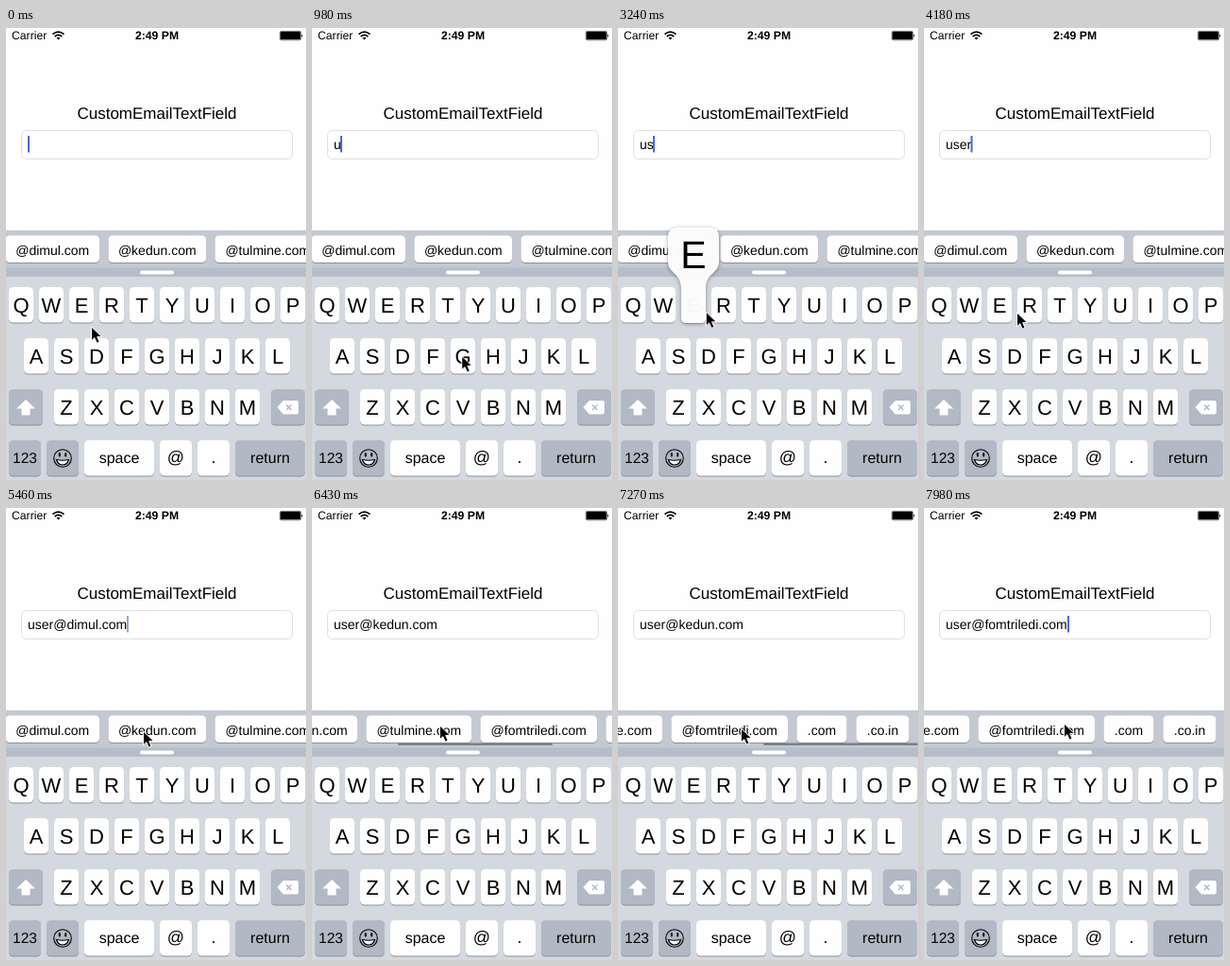
Animation of 318 by 478 pixels, one loop 8 s. Source, as an HTML page:

```html
<!DOCTYPE html>
<html lang="en">
<head>
<meta charset="utf-8">
<title>CustomEmailTextField</title>
<style>
html, body { margin: 0; width: 100%; height: 100%; overflow: hidden; background: #fefefe; }
svg { display: block; width: 318px; height: 478px; font: 14px "Liberation Sans", Arial, sans-serif; text-rendering: geometricPrecision; }
.mid { text-anchor: middle; }
.key { fill: #fefefe; }
.key.dark { fill: #b1b9c5; }
.under { fill: #8d929a; }
.anim, .step { animation: 8s infinite; }
.anim { animation-timing-function: ease-in-out; }
.step { animation-timing-function: step-end; }
#cursor { animation-name: cursor; }
#strip { animation-name: scroll; }
#bar { animation-name: bar; }
#thumb { animation-name: thumb; }
#typed { animation-name: typed; }
#caretPos { animation-name: caretPos; }
#caret { animation: blink 8s linear infinite; }
#marked, #suggest { animation-name: suggest; }
.popup { filter: drop-shadow(0 1px 2px rgba(0,0,0,.35)); }
.popup path { fill: #fefefe; fill-opacity: .97; }
#popU { animation-name: popU; }
#popS { animation-name: popS; }
#popE { animation-name: popE; }
#popR { animation-name: popR; }
#chip0 { animation-name: press0; }
#chip1 { animation-name: press1; }
#chip3 { animation-name: press3; }

@keyframes cursor {
  0%, .75% { transform: translate(90px, 316px); }
  5.25% { transform: translate(210px, 298px); }
  7.5% { transform: translate(208px, 298px); }
  10.1% { transform: translate(190px, 346px); }
  10.9% { transform: translate(184px, 347px); }
  15% { transform: translate(72px, 346px); }
  18.1% { transform: translate(68px, 346px); }
  20.9%, 21.6% { transform: translate(71px, 313px); }
  23%, 24.75% { transform: translate(78px, 298px); }
  25.75% { transform: translate(82px, 296px); }
  31.25%, 37.5% { transform: translate(84px, 299px); }
  42.75%, 53.1% { transform: translate(98px, 301px); }
  56.75% { transform: translate(112px, 241px); }
  59.25%, 61.9% { transform: translate(62px, 236px); }
  66.5%, 70% { transform: translate(145px, 236px); }
  73.75%, 74.75% { transform: translate(299px, 236px); }
  79.75%, 80.6% { transform: translate(135px, 230px); }
  83.75%, 84.5% { transform: translate(252px, 233px); }
  88.5%, 92.5% { transform: translate(130px, 233px); }
  99.75%, 100% { transform: translate(148px, 228px); }
}
@keyframes scroll {
  0%, 74.75% { transform: translateX(0); }
  79.75%, 84.5% { transform: translateX(-164px); }
  88.5% { transform: translateX(-287px); }
  89.1%, 91% { transform: translateX(-286px); }
  91.2%, 100% { transform: translateX(-285px); }
}
@keyframes bar {
  0%, 74.75% { transform: translateX(3.5px); }
  79.75%, 84.5% { transform: translateX(91px); }
  88.5%, 100% { transform: translateX(154px); }
}
@keyframes thumb {
  0%, 74.75% { opacity: 0; }
  75.5%, 91% { opacity: 1; }
  93.75%, 100% { opacity: 0; }
}
@keyframes typed {
  0% { transform: translateY(0); }
  7.5% { transform: translateY(-40px); }
  18.75% { transform: translateY(-80px); }
  46.5% { transform: translateY(-120px); }
  50.6% { transform: translateY(-160px); }
  61.9% { transform: translateY(-200px); }
  70% { transform: translateY(-240px); }
  95%, 100% { transform: translateY(-280px); }
}
@keyframes caretPos {
  0% { transform: translateX(23px); }
  7.5% { transform: translateX(30px); }
  18.75% { transform: translateX(37px); }
  46.5% { transform: translateX(45px); }
  50.6% { transform: translateX(49.5px); }
  61.9% { transform: translateX(128px); }
  70% { transform: translateX(132.5px); }
  95%, 100% { transform: translateX(152px); }
}
@keyframes blink {
  0%, 1.25%, 7.5%, 12.5%, 18.1%, 19.25%, 27.25%, 29.6%, 38%, 41%, 46.75%, 56%,
  61.9%, 67.5%, 70%, 76%, 83.1%, 86.9%, 94%, 100% { opacity: 1; }
  3.25%, 6%, 14.1%, 17.5%, 20.75%, 25.9%, 31.25%, 36.5%, 42.75%, 46.5%, 57.5%, 60.6%,
  77.5%, 81.9%, 88.4%, 92.5% { opacity: 0; }
  68.25%, 69.5% { opacity: .6; }
}
@keyframes suggest { 0%, 36.6%, 100% { visibility: hidden; } 20% { visibility: visible; } }
@keyframes popU { 0%, 7.5%, 100% { visibility: hidden; } 5.6% { visibility: visible; } }
@keyframes popS { 0%, 36.6%, 100% { visibility: hidden; } 17.25% { visibility: visible; } }
@keyframes popE { 0%, 46.5%, 100% { visibility: hidden; } 37.4% { visibility: visible; } }
@keyframes popR { 0%, 50.6%, 100% { visibility: hidden; } 48.1% { visibility: visible; } }
@keyframes press0 { 0%, 61.9%, 100% { fill: #fefefe; } 60% { fill: #e4e7ec; } }
@keyframes press1 { 0%, 70%, 100% { fill: #fefefe; } 68.75% { fill: #e4e7ec; } }
@keyframes press3 { 0%, 95%, 100% { fill: #fefefe; } 93.1% { fill: #e4e7ec; } }
</style>
</head>
<body>
<svg viewBox="0 0 318 478">
  <clipPath id="inside"><rect x="17" y="109" width="286" height="29"/></clipPath>

  <!-- status bar -->
  <text x="6" y="12.3" font-size="12.2">Carrier</text>
  <g fill="none" stroke="#000" stroke-width="1.7">
    <path d="M49.5 6.6Q55.5 1.6 61.5 6.6M51.7 9Q55.5 5.8 59.3 9"/>
    <path d="M55.5 12.6l-2-2.1q2-1.6 4 0z" fill="#000" stroke="none"/>
  </g>
  <text class="mid" x="160" y="12.3" font-size="12.2" font-weight="bold">2:49 PM</text>
  <rect x="290.3" y="3.4" width="22.4" height="9.4" rx="1.8" fill="none" stroke="#000" stroke-width=".6"/>
  <rect x="291" y="4.1" width="21" height="8" rx="1"/>
  <path d="M313.4 6.4q1.9 1.700 0 3.400z"/>

  <!-- form -->
  <text class="mid" x="160" y="96" font-size="17">CustomEmailTextField</text>
  <rect x="16.5" y="108.5" width="287" height="30" rx="5" fill="#fff" stroke="#e0e0e0"/>
  <rect id="marked" class="step" x="21" y="113" width="20" height="19" fill="#c9def0"/>
  <g clip-path="url(#inside)"><g id="typed" class="step"></g></g>
  <g id="caretPos" class="step"><rect id="caret" y="114" width="2" height="17.5" fill="#4169e4"/></g>
  <g id="suggest" class="step">
    <path d="M20.5 132.5H59a10.9 10.9 0 0 1 0 21.8H28Q20.5 154.3 20.5 147Z" fill="#fff" stroke="#b4b4b4"/>
    <text x="23" y="149" fill="#2a6fdc">U.S.</text>
    <path d="M54.5 140l7.5 7.5m0-7.5l-7.5 7.5" stroke="#b0b0b0" stroke-width="1.2"/>
  </g>

  <!-- keyboard -->
  <rect y="214" width="318" height="264" fill="#d4d8df"/>
  <rect y="214" width="318" height="40" fill="#c3c9d2"/>
  <g id="strip" class="anim"></g>
  <g id="bar" class="anim"><rect id="thumb" class="anim" y="248.5" width="164" height="2.5" rx="1.2" fill="#7b7f86"/></g>
  <rect y="253.5" width="318" height="9.5" fill="#b5bdc9"/>
  <rect x="142" y="256.5" width="36" height="4" rx="2" fill="#fefefe"/>
  <g id="keys"></g>
  <path d="M21 393l10 9.500h-5.500v7h-9v-7H11z" fill="#fefefe"/>
  <path d="M287.500 401l6.500-7H308q2 0 2 2v10.500q0 2-2 2h-14z" fill="#fefefe"/>
  <path d="M297 398.500l5.500 5.500m0-5.500l-5.500 5.500" stroke="#b1b9c5" stroke-width="1.4"/>
  <g fill="none" stroke="#000" stroke-width="1.1">
    <circle cx="60" cy="455" r="9.3"/>
    <path d="M53.500 456.500q6.500 1.600 13 0q-1.300 5.500-6.500 5.500t-6.500-5.500z" fill="#fefefe"/>
    <path d="M56.800 450v2.600m6.400-2.600v2.600" stroke-width="2" stroke-linecap="round"/>
  </g>
  <g id="popups"></g>

  <g id="cursor" class="anim">
    <path d="M.5 0V14.800l3.300-3.100 2.400 5.500 2.900-1.200-2.400-5.400H11.500z" stroke="#fff"/>
  </g>
</svg>
<script>
const $ = id => document.getElementById(id);

function add(parent, tag, attrs, text) {
  const el = document.createElementNS("http://www.w3.org/2000/svg", tag);
  for (const name in attrs) el.setAttribute(name, attrs[name]);
  if (text) el.textContent = text;
  return parent.appendChild(el);
}

function button(parent, x, y, w, h, label, size, baseline, extra = {}) {
  const box = { x, y, width: w, height: h, rx: 4.5 };
  add(parent, "rect", { ...box, y: y + 1, class: "under" });
  add(parent, "rect", { ...box, class: "key", ...extra });
  add(parent, "text", { x: x + w / 2, y: y + baseline, "font-size": size, class: "mid" }, label);
}

// Typed text, one line per state
const domains = ["@dimul.com", "@kedun.com", "@tulmine.com", "@fomtriledi.com"];
const states = ["", "u", "us", "use", "user",
  "user" + domains[0], "user" + domains[1], "user" + domains[3]];
states.forEach((s, i) => add($("typed"), "text", { x: 23, y: 128 + 40 * i }, s));

// Scrolling domain chips: left edge and width
const chips = [[-.5, 99.5], [108.5, 103.5], [221.5, 111.5], [342.5, 123.5], [475.5, 53], [538.5, 56]];
[...domains, ".com", ".co.in"].forEach((label, i) => {
  const [x, w] = chips[i];
  button($("strip"), x, 219.5, w, 28.5, label, 14, 20, { id: "chip" + i, class: "key step" });
});

// Letter keys
const rows = [["QWERTYUIOP", 3], ["ASDFGHJKL", 19], ["ZXCVBNM", 51]];
rows.forEach(([letters, left], r) => [...letters].forEach((c, i) =>
  button($("keys"), left + 32 * i, 274 + 54 * r, 26, 37.5, c, 22, 27.2)));

// Function keys: left, top, width, label, size, dark
[[3, 382, 36, "", 16, 1], [281, 382, 36, "", 16, 1],
 [3, 436, 34, "123", 15.5, 1], [43, 436, 34, "", 16, 1],
 [83, 436, 74, "space", 16, 0], [163, 436, 34, "@", 18, 0],
 [203, 436, 34, ".", 18, 0], [243, 436, 74, "return", 16, 1]
].forEach(([x, y, w, label, size, dark]) =>
  button($("keys"), x, y, w, 37.5, label, size, 24, { class: dark ? "key dark" : "key" }));

// Enlarged keys, placed by key centre and top
const bubble = "M-27-53q0-10 10-10H17q10 0 10 10V-28C27-13 13-16 13 2V33q0 5-5 5H-8" +
  "q-5 0-5-5V2C-13-16-27-13-27-28Z";
[["U", 208, 274], ["S", 64, 328], ["E", 80, 274], ["R", 112, 274]].forEach(([c, x, y]) => {
  const place = add($("popups"), "g", { transform: `translate(${x} ${y})` });
  const pop = add(place, "g", { id: "pop" + c, class: "popup step" });
  add(pop, "path", { d: bubble });
  add(pop, "text", { y: -20, "font-size": 41, class: "mid" }, c);
});
</script>
</body>
</html>
```
